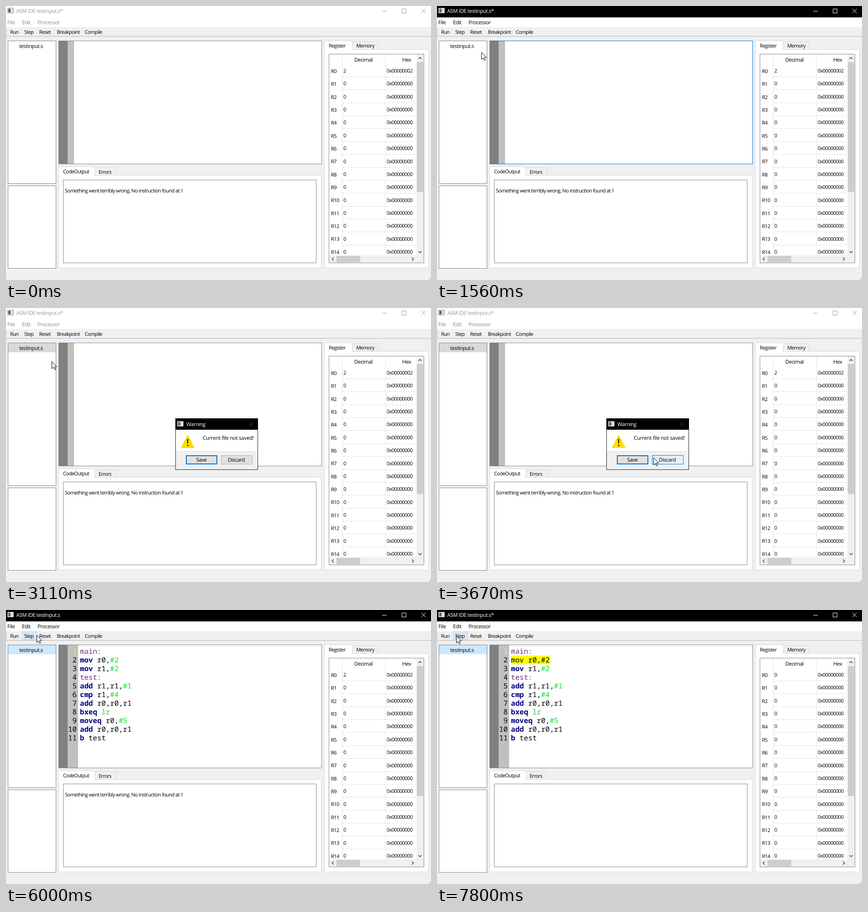
An HTML page that plays this animation: 931x601 px, repeating every 8000 ms.

```html
<!DOCTYPE html>
<html lang="en">
<head>
<meta charset="utf-8">
<title>Assembler IDE</title>
<style>
html, body { margin: 0; width: 100%; height: 100%; overflow: hidden; background: #f0f0f0; }
svg { display: block; width: 931px; height: 601px; }
text { white-space: pre; text-rendering: geometricPrecision; }
.ui { font: 11.5px "Open Sans", "Noto Sans", sans-serif; letter-spacing: -.45px; }
.tight { font: 11px "Open Sans", "Noto Sans", sans-serif; letter-spacing: -.6px; }
.code { font: 15.72px "Noto Sans Mono", "DejaVu Sans Mono", monospace; }
rect { shape-rendering: crispEdges; }
</style>
</head>
<body>
<svg viewBox="0 0 931 601"><g id="base"></g><g id="live"></g></svg>
<script>
const LOOP = 8000;
const BORDER = '#828790', TAB = '#dadada', BLUE = '#0078d7';

const box = (x, y, w, h, fill) => `<rect x="${x}" y="${y}" width="${w}" height="${h}" fill="${fill}"/>`;
// Filled box with a border of b pixels inside its edge
const frame = (x, y, w, h, fill, line, b = 1) =>
  box(x, y, w, h, line) + box(x + b, y + b, w - 2 * b, h - 2 * b, fill);
const text = (x, y, s, cls = 'ui', fill = '#000', extra = '') =>
  `<text x="${x}" y="${y}" class="${cls}" fill="${fill}" ${extra}>${s}</text>`;
const path = (d, stroke, fill = 'none', extra = '') =>
  `<path d="${d}" stroke="${stroke}" fill="${fill}" ${extra}/>`;
const chevron = (x, y, dx, dy) => path(
  dx ? `M${x - dx} ${y - 3.5}l${2 * dx} 3.5l${-2 * dx} 3.5` : `M${x - 3.5} ${y - dy}l3.5 ${2 * dy}l3.5 ${-2 * dy}`,
  '#505050', 'none', 'stroke-width="1.6"');
const icon = (x, y) => frame(x, y, 14, 12, '#f4f4f4', '#8a8f96') +
  box(x + 2, y + 2, 5, 8, '#4a6580') + box(x + 8, y + 2, 4, 8, '#d5dade');

const ROW = 28.36;
const rows = [...Array(15).keys()];

function drawBase() {
  let s = box(0, 0, 931, 601, '#f0f0f0') + box(0, 66, 931, 1, '#b4b4b4');
  for (let y = 50; y < 64; y += 4) s += box(0, y, 1, 2, '#a0a0a0');
  s += frame(4, 76, 106, 314, '#fff', BORDER) + frame(4, 394, 106, 182, '#fff', BORDER);

  s += frame(115, 371, 576, 204, '#fff', TAB) + frame(194, 354, 48, 18, '#f0f0f0', TAB) +
    frame(115, 352, 80, 21, '#fff', TAB) + box(116, 371, 78, 3, '#fff') +
    text(125, 366.5, 'CodeOutput', 'tight') + text(203, 367.5, 'Errors', 'tight') +
    frame(125, 381, 555, 183, '#fff', BORDER);

  s += frame(697, 95, 229, 480, '#fff', TAB) + frame(758, 78, 57, 18, '#f0f0f0', TAB) +
    frame(697, 76, 62, 21, '#fff', TAB) + box(698, 95, 60, 3, '#fff') +
    text(707, 90.5, 'Register', 'tight') + text(767.5, 91, 'Memory', 'tight') +
    frame(707, 105, 209, 459, '#fff', BORDER) +
    box(736, 106, 1, 441, '#e2e2e2') + box(831, 106, 1, 24, '#e2e2e2') +
    path('M831.5 130V547', '#d8d8d8', 'none', 'stroke-dasharray="4 2"') +
    text(763, 121.5, 'Decimal') + text(868, 121.5, 'Hex');
  for (const i of rows) {
    const y = 142 + i * ROW;
    s += text(712, y + 4.8, 'R' + i, 'tight');
    if (i) s += text(739, y + 4, '0', 'tight') + text(834, y + 4, '0x00000000', 'tight');
    if (i < 14) s += path(`M737 ${Math.round(y + 13) + .5}H899`, '#d8d8d8', 'none', 'stroke-dasharray="4 2"');
  }
  s += box(899, 106, 16, 457, '#f0f0f0') + box(708, 547, 207, 16, '#f0f0f0') +
    box(900, 123, 14, 285, '#cdcdcd') + box(724, 548, 52, 14, '#cdcdcd') +
    chevron(907, 114.5, 0, -1.8) + chevron(907, 539.5, 0, 1.8) +
    chevron(716, 555, -1.8, 0) + chevron(891, 555, 1.8, 0);
  for (const [x, y] of [[929, 596], [926, 599], [929, 599]]) s += box(x, y, 2, 2, '#bfbfbf');
  return s;
}

// Pointer moves: start, end, number of steps, destination
const MOVES = [
  [70, 390, 5, 282, 180], [620, 930, 5, 272, 168],
  [1320, 1560, 4, 97, 101], [1640, 1710, 2, 27, 98],
  [1860, 2100, 4, 47, 87], [3110, 3670, 8, 474, 328],
  [5070, 5310, 4, 259, 256], [5540, 6000, 7, 67, 55],
  [6150, 6390, 4, 140, 59], [6460, 6620, 3, 190, 57],
  [7410, 7650, 4, 38, 53], [7800, 7800, 1, 42, 56]
];

function pointer(t) {
  let x = 914, y = 675;
  for (const [from, to, n, tx, ty] of MOVES) {
    if (t < from) break;
    const k = Math.min(n, 1 + Math.floor((t - from) / Math.max(1, to - from) * (n - 1) + 1e-6)) / n;
    x += (tx - x) * k;
    y += (ty - y) * k;
  }
  return [x, y];
}

const within = ([x, y], l, t, r, b) => x >= l && x < r && y >= t && y < b;

function drawPointer(p, dialog) {
  const overText = !dialog && (within(p, 150, 77, 691, 346) || within(p, 126, 382, 679, 563));
  const shape = overText
    ? path('M-3.5-7.5H-1.5L0-6.5 1.5-7.5H3.5M0-6.5V6.5M-3.5 7.5H-1.5L0 6.5 1.5 7.5H3.5', '#000')
    : path('M.5.5V16.2L4.1 12.8 6.5 18.2 8.9 17.2 6.5 11.8H11.5Z', '#000', '#fff');
  return `<g transform="translate(${p.map(Math.round)})">${shape}</g>`;
}

function drawTitle(active, menuOn, starred) {
  const ink = active ? '#fff' : '#999';
  return box(0, 0, 931, 25, active ? '#000' : '#fff') + box(0, 25, 931, 21, '#fff') + icon(3, 4) +
    text(22.5, 15.3, 'ASM IDE testinput.s' + (starred ? '*' : ''), 'ui', ink) +
    box(824, 11, 10, 1, ink) +
    path('M867.5 6.5h9v9h-9zM910 6l9.5 9.5M919.5 6L910 15.5', ink) +
    [[3, 'File'], [35, 'Edit'], [69, 'Processor']]
      .map(([x, s]) => text(x, 40, s, 'ui', menuOn ? '#000' : '#8c8c8c')).join('');
}

const TOOLS = [[9, 'Run', 4, 33], [40, 'Step', 35, 68], [72.5, 'Reset', 68, 106],
  [111.5, 'Breakpoint', 106, 167], [172.5, 'Compile', 167, 214]];

function drawTools(p, pressed) {
  return TOOLS.map(([x, name, l, r]) =>
    (within(p, l, 47, r, 66) ? frame(l, 47, r - l, 19, pressed ? '#c0dcf3' : '#d8e6f2', '#c4dcf0') : '') +
    text(x, 61, name, 'tight')).join('');
}

const CODE = ['main:', 'mov r0,#2', 'mov r1,#2', 'test:', 'add r1,r1,#1', 'cmp r1,#4',
  'add r0,r0,r1', 'bxeq lr', 'moveq r0,#5', 'add r0,r0,r1', 'b test'];
const span = (s, fill, weight = 400) => `<tspan fill="${fill}" font-weight="${weight}">${s}</tspan>`;
const paint = line => line.endsWith(':') ? span(line, '#7a2a86')
  : line.replace(/^\w+|#\d|\blr$/g, (m, at) =>
      m[0] === '#' ? span(m, '#00e61e') : at ? span(m, '#35c95c') : span(m, '#000080', 700));

function drawEditor(focus, loaded, stepping, caret) {
  let s = frame(115, 76, 577, 271, '#fff', focus ? BLUE : BORDER) +
    box(115, 77, 20, 269, '#808080') + box(135, 77, loaded ? 23 : 14, 269, '#c0c0c0');
  if (caret) s += box(152, 80, 1, 19, '#000');
  if (!loaded) return s + text(138.5, 94.5, '1', 'tight', '#ffc83c', 'font-weight="700"');
  if (stepping) s += box(162, 100, 86, 19, '#ff0');
  CODE.forEach((line, i) => {
    const y = 96.2 + i * 18.93;
    s += text(155, y, i + 1, 'code', i ? '#000' : '#e6ff28', 'text-anchor="end"') +
      text(162, y, stepping && i === 1 ? line : paint(line), 'code');
  });
  return s;
}

function drawDialog(t, p) {
  const clicked = t >= 4220, down = clicked && t < 4300, hover = within(p, 471, 323, 540, 343);
  const discard = down ? ['#cce4f7', '#005499'] : hover ? ['#e5f1fb', BLUE] : ['#e1e1e1', '#adadad'];
  const save = clicked ? ['#adadad', 1] : [BLUE, 2];
  return frame(371, 242, 181, 113, '#fff', '#222') + box(371, 242, 181, 25, '#000') +
    icon(375, 248) + text(395, 258.6, 'Warning', 'ui', '#fff') +
    path('M532.5 250.5l9 9M541.5 250.5l-9 9', '#444') +
    box(372, 314, 179, 40, '#f0f0f0') + box(372, 314, 179, 1, '#dfdfdf') +
    path('M398 278.5L412.5 306.5H383.5Z', '#fedc00', '#fedc00', 'stroke-linejoin="round"') +
    path('M396.7 287.5h2.6l-.5 10h-1.6z', 'none', '#111') +
    '<circle cx="398" cy="301.5" r="1.5" fill="#111"/>' +
    text(431, 289, 'Current file not saved!', 'ui', '#000', 'style="letter-spacing:-.3px"') +
    frame(394, 323, 69, 20, '#e1e1e1', ...save) + frame(471, 323, 69, 20, ...discard) +
    text(416.5, 337, 'Save') + text(486, 337, 'Discard');
}

function drawRow(t, p) {
  let s = '';
  if (t >= 4610) s = box(5, 77, 104, 20, '#cce8ff');
  else if (t >= 2720) s = box(5, 77, 104, 20, '#d9d9d9');
  else if (t >= 2560) s = frame(5, 77, 104, 20, '#cce8ff', '#99d1ff');
  else if (within(p, 5, 77, 109, 97)) s = box(5, 77, 104, 20, '#e5f3ff');
  return s + text(29, 92, 'testinput.s');
}

function scene(t) {
  const during = (a, b) => t >= a && t < b;
  const p = pointer(t);
  const dialog = during(2720, 4530), loaded = t >= 4610, compiled = t >= 6940;
  const front = during(780, 2720);
  let s = drawTitle(front || t >= 4530, front || loaded, !loaded || compiled) +
    drawTools(p, during(6860, 6940)) + drawRow(t, p) +
    drawEditor(during(780, 2560), loaded, compiled, during(820, 1340) || during(1880, 2410));
  const r0 = compiled ? 0 : 2;
  s += text(739, 146, r0, 'tight') + text(834, 146, '0x0000000' + r0, 'tight');
  if (!compiled) s += text(129, 409, 'Something went terribly wrong. No instruction found at 1', 'tight');
  if (dialog) s += drawDialog(t, p);
  if (t >= 70) s += drawPointer(p, dialog);
  return s;
}

const live = document.getElementById('live');
document.getElementById('base').innerHTML = drawBase();
const start = performance.now();
let last = '';
function tick() {
  const now = scene((performance.now() - start) % LOOP);
  if (now !== last) live.innerHTML = last = now;
  requestAnimationFrame(tick);
}
tick();
</script>
</body>
</html>
```
